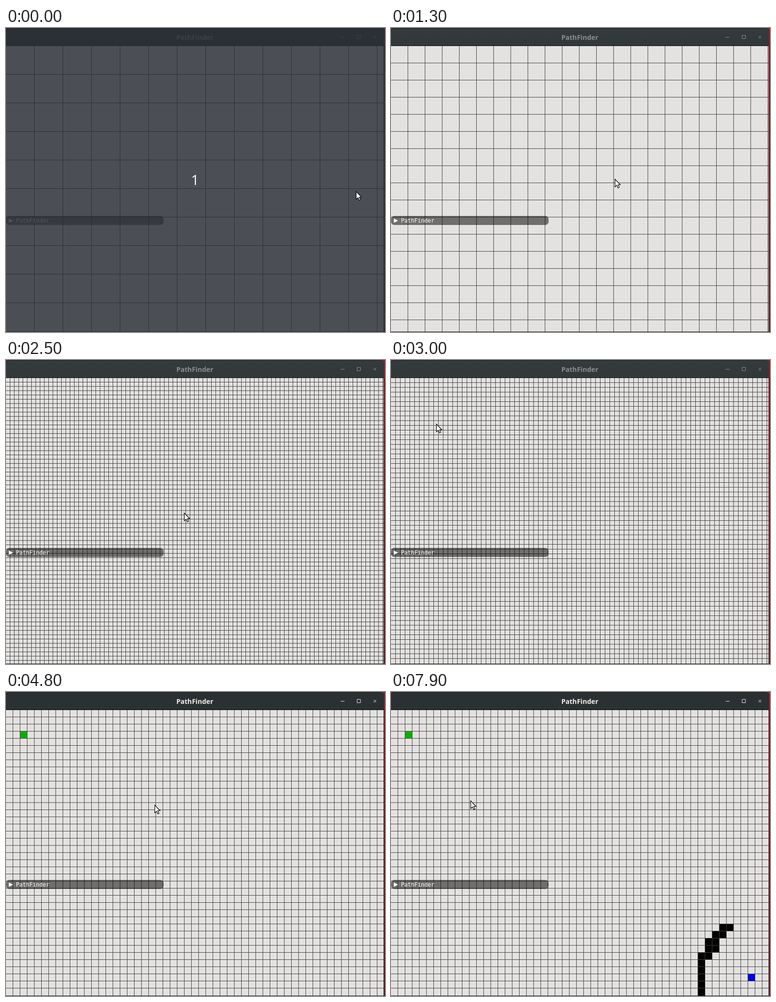
An HTML page with a canvas that plays this animation: 796x639 px, repeating every 8 s.

```html
<!DOCTYPE html>
<html lang="en">
<head>
<meta charset="utf-8">
<title>PathFinder</title>
<style>
html, body { margin: 0; width: 100%; height: 100%; overflow: hidden; }
body { position: relative; background: linear-gradient(#a3191d, #7c1a1d); }
body * { position: absolute; box-sizing: border-box; }
#win { left: -1px; top: 0; width: 795px; height: 639px; background: #1c1e1e; border-radius: 8px 8px 0 0; }
#bar {
  left: 0; top: 1px; width: 794px; height: 37px; border-radius: 7px 7px 0 0;
  background: linear-gradient(#353b3d, #31383a); border-bottom: 1px solid #1b2022;
  color: #8b8e8f;
}
#bar.on { background: #2b3032; border-color: #0e1112; color: #eeeeec; }
#name {
  left: 0; width: 793px; top: 9px; text-align: center;
  font: bold 14.1px/19px "Open Sans", "Noto Sans", sans-serif;
}
#bar svg { left: 0; top: 0; fill: none; stroke: currentColor; }
#grid { left: 0; top: 38px; }
#panel {
  left: 0; top: 395px; width: 331px; height: 19px; border-radius: 7px;
  background: rgba(0, 0, 0, .51); color: #fff;
}
#panel span { left: 21px; top: 3px; font: 11.63px/14px "DejaVu Sans Mono", monospace; }
#panel svg { left: 0; top: 0; fill: #fff; }
#shade { inset: 0; background: rgba(41, 45, 53, .81); }
#shade span {
  left: 0; width: 794px; top: 299px; text-align: center; color: #fff;
  font: 29px/40px "Open Sans", "Noto Sans", sans-serif;
}
#mouse { left: 0; top: 0; overflow: visible; }
</style>
</head>
<body>
<div id="win"></div>
<div id="bar">
  <div id="name">PathFinder</div>
  <svg width="794" height="36"><path d="M703 18.5h8M737.5 14.5h7v7h-7zM772 15.5l5.5 5.5M777.5 15.5l-5.5 5.5"/></svg>
</div>
<canvas id="grid" width="793" height="600"></canvas>
<div id="panel">
  <svg width="20" height="19"><path d="M6 5.5v9l9-4.5z"/></svg>
  <span>PathFinder</span>
</div>
<div id="shade"><span>1</span></div>
<svg id="mouse" width="14" height="21">
  <path d="M.5 .8V17L4.3 13.5L6.8 19.2L9.4 18L7 12.5H11.6Z" fill="#fff" stroke="#000" stroke-width="1.2"/>
</svg>
<script>
const LOOP = 8000, STEP = 100;
const $ = id => document.getElementById(id);
const ctx = $('grid').getContext('2d');

// stops of the pointer: time, x, y
const stops = [
  [0, 735, 343], [700, 275, 272], [1800, 619, 351], [2500, 374, 321], [3000, 95, 134],
  [4200, 36, 88], [4800, 312, 237], [5100, 708, 537], [5500, 757, 592], [6000, 762, 467],
  [6300, 712, 490], [6900, 650, 640], [7100, 715, 640], [7700, 196, 293], [7900, 167, 228]
];

const clamp = (v, lo, hi) => Math.max(lo, Math.min(hi, v));
const ease = p => p * p * (3 - 2 * p);

function pointerAt(t) {
  const i = Math.max(0, stops.findLastIndex(s => s[0] <= t));
  const [t0, x0, y0] = stops[i];
  const [t1, x1, y1] = stops[i + 1] || [LOOP, x0, y0];
  const p = ease((t - t0) / (t1 - t0));
  return [x0 + (x1 - x0) * p, y0 + (y1 - y0) * p];
}

// zoom out with a slowing wheel, then back in one pixel per step
function cellSize(t) {
  if (t >= 2900) return clamp(10 + (t - 3000) / STEP, 8, 15);
  const u = (t - 700) / 1000;
  return clamp(Math.round(51 - 26.45 * u + 1.73 * u * u), 8, 60);
}

function drawGrid(t) {
  const { width, height } = ctx.canvas, size = cellSize(t);
  const cell = (start, col, row, color, cols = 1) => {
    if (t < start) return;
    ctx.fillStyle = color;
    ctx.fillRect(col * size, row * size, cols * size, size);
  };
  ctx.fillStyle = '#e3e2e0';
  ctx.fillRect(0, 0, width, height);
  cell(4300, 2, 3, '#08b000');
  cell(5500, 50, 37, '#0000f0');
  for (let row = 30; row < 40; row++) {
    const bend = Math.max(0, Math.round((34 - row) * .7));
    cell(6350 + (row - 30) * 50, 43 + bend, row, '#000', row < 35 ? 2 : 1);
  }
  ctx.fillStyle = '#424241';
  for (let x = size - 1; x < width; x += size) ctx.fillRect(x, 0, 1, height);
  for (let y = size - 1; y < height - 1; y += size) ctx.fillRect(0, y, width, 1);
}

function render(time) {
  const t = Math.floor((time % LOOP) / STEP) * STEP;
  const [x, y] = pointerAt(t).map(Math.round);
  drawGrid(t);
  $('bar').className = t >= 4000 ? 'on' : '';
  $('shade').style.display = t < STEP ? '' : 'none';
  $('mouse').style.transform = `translate(${x}px, ${y}px)`;
}

const begin = performance.now();
function tick() {
  render(performance.now() - begin);
  requestAnimationFrame(tick);
}
tick();
</script>
</body>
</html>
```
